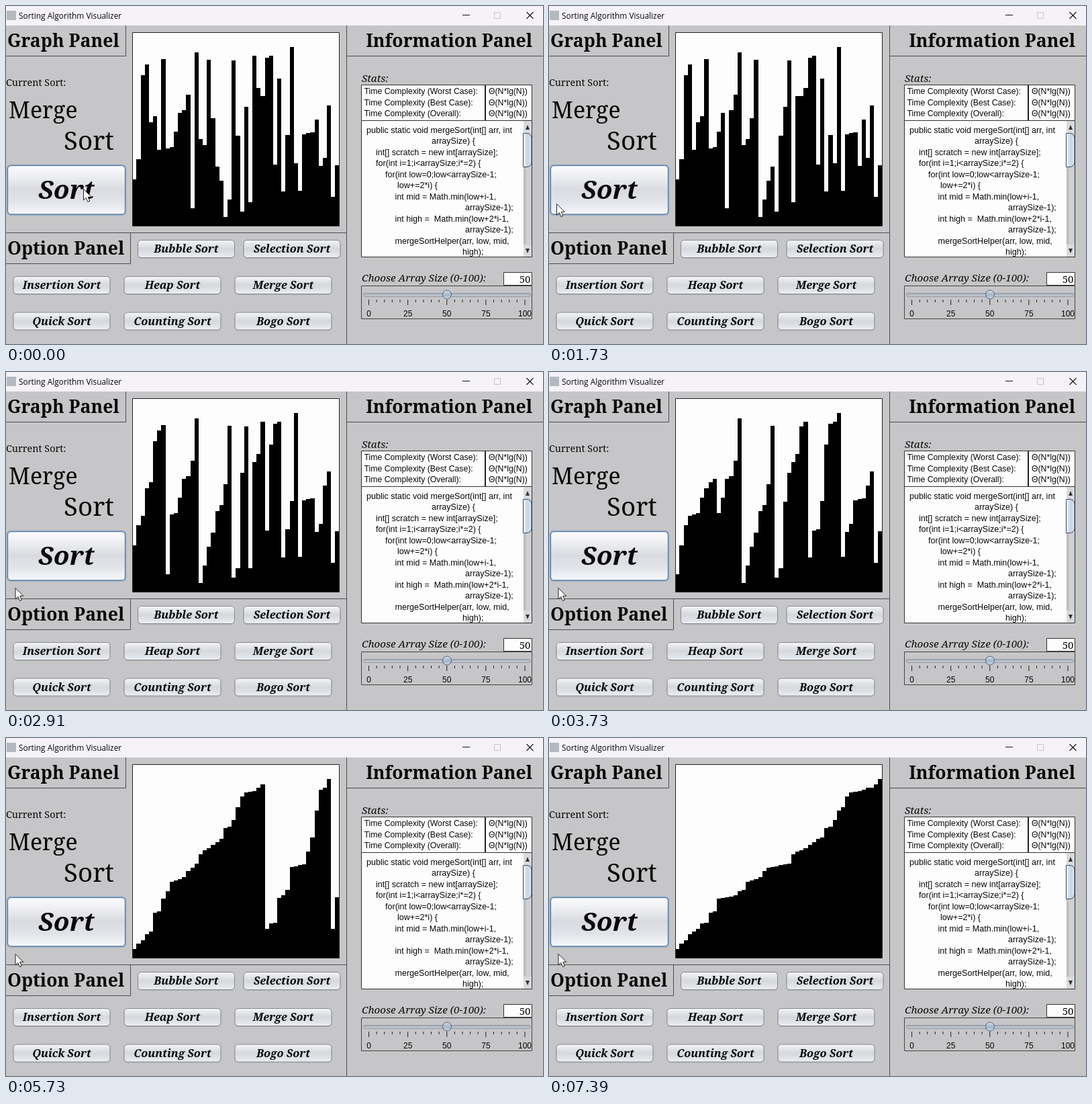
Recreate the animation shown at these times as an HTML page with a canvas. Size 800x503 px, loop 7.64 s.

```html
<!DOCTYPE html>
<html lang="en">
<head>
<meta charset="utf-8">
<title>Sorting Algorithm Visualizer</title>
<style>
html, body { margin: 0; width: 100%; height: 100%; overflow: hidden; background: #c6c5c7; }
canvas { display: block; }
</style>
</head>
<body>
<canvas id="stage" width="800" height="503"></canvas>
<script>
const ctx = document.getElementById('stage').getContext('2d');
const LOOP = 7640;
const SERIF = '"Noto Serif", Georgia, serif';
const ARIAL = '"Liberation Sans", Arial, sans-serif';

// Bar tops in pixels, before sorting.
const tops = [
  258, 228, 103, 87, 173, 164, 214, 79, 212, 210, 187, 159, 155, 132, 301, 69, 198,
  207, 80, 167, 239, 260, 314, 288, 81, 193, 306, 150, 292, 74, 122, 134, 77, 74,
  236, 108, 276, 192, 61, 234, 275, 191, 189, 188, 169, 238, 226, 148, 284, 237];

// [time, array writes done] and [time, x, y]
const progress = [[0, 16], [1730, 80], [2910, 126], [3390, 147], [3550, 151],
  [3730, 160], [4850, 202], [5730, 236], [7390, 300], [LOOP, 300]];
const pointer = [[0, 115, 272], [150, 115, 272], [900, 28, 290], [1730, 11, 294],
  [2150, 13.5, 321], [LOOP, 13.5, 321]];

// Bottom-up merge sort; every copy back from scratch is one visible write.
function mergeWrites(source) {
  const arr = [...source], writes = [], n = arr.length;
  for (let size = 1; size < n; size *= 2) {
    for (let low = 0; low < n - 1; low += 2 * size) {
      const merged = arr.slice(low, low + 2 * size).sort((a, b) => b - a);
      merged.forEach((v, k) => { arr[low + k] = v; writes.push([low + k, v]); });
    }
  }
  return writes;
}
const writes = mergeWrites(tops);

function track(keys, t) {
  let i = 0;
  while (i < keys.length - 2 && t >= keys[i + 1][0]) i++;
  const a = keys[i], b = keys[i + 1], p = (t - a[0]) / (b[0] - a[0]);
  return a.slice(1).map((v, k) => v + (b[k + 1] - v) * p);
}

function text(str, x, y, font, align = 'left', color = '#080808') {
  ctx.font = font;
  ctx.textAlign = align;
  ctx.fillStyle = color;
  ctx.fillText(str, x, y);
}

function line(color, width, ...pts) {
  ctx.beginPath();
  for (let i = 0; i < pts.length; i += 2) ctx.lineTo(pts[i], pts[i + 1]);
  ctx.strokeStyle = color;
  ctx.lineWidth = width;
  ctx.stroke();
}

function shape(pts, fill, stroke) {
  ctx.beginPath();
  for (let i = 0; i < pts.length; i += 2) ctx.lineTo(pts[i], pts[i + 1]);
  ctx.closePath();
  ctx.fillStyle = fill;
  ctx.fill();
  if (stroke) { ctx.strokeStyle = stroke; ctx.lineWidth = 1; ctx.stroke(); }
}

function box(x, y, w, h, fill, stroke, radius = 0, width = 1) {
  ctx.beginPath();
  ctx.roundRect(x, y, w, h, radius);
  if (fill) { ctx.fillStyle = fill; ctx.fill(); }
  if (stroke) { ctx.strokeStyle = stroke; ctx.lineWidth = width; ctx.stroke(); }
}

function shade(x0, y0, x1, y1, ...colors) {
  const g = ctx.createLinearGradient(x0, y0, x1, y1);
  colors.forEach((c, i) => g.addColorStop(i / (colors.length - 1), c));
  return g;
}

function button(label, x, y) {
  box(x + .5, y + 1.5, 144, 26, null, '#b1b1b5', 5);
  box(x + .5, y + .5, 144, 26,
    shade(0, y, 0, y + 27, '#f7f8f9', '#e4e6e9', '#d5d8dd', '#dfe2e7', '#eff1f5'), '#85888e', 5);
  text(label, x + 72.5, y + 19, `italic bold 16.3px ${SERIF}`, 'center');
}

function titleBar() {
  box(0, 0, 800, 29, '#f5f3f7');
  box(1, 7, 14, 14, '#b4b9c0');
  text('Sorting Algorithm Visualizer', 19, 19, '11.9px "Open Sans", sans-serif');
  line('#111', 1, 680, 13.5, 691, 13.5);
  box(727.5, 9.5, 9, 9, null, '#c4c2c6');
  line('#111', 1.1, 775.5, 9, 785.5, 19);
  line('#111', 1.1, 785.5, 9, 775.5, 19);
}

function frames() {
  const edge = '#4c4b4d', heading = `bold 26.6px ${SERIF}`;
  line(edge, 1, 507.5, 29, 507.5, 503);
  line(edge, 1, 0, 337.5, 507, 337.5);
  line(edge, 1, 0, 74.5, 178.5, 74.5, 178.5, 29);
  line(edge, 1, 0, 383.5, 185.5, 383.5, 185.5, 338);
  line(edge, 1, 508, 74.5, 800, 74.5);
  text('Graph Panel', 2, 61, heading);
  text('Option Panel', 2, 370, heading);
  text('Information Panel', 784, 61, heading, 'right');
}

function sortControls() {
  text('Current Sort:', 0, 119, `14.4px ${SERIF}`);
  text('Merge', 4, 167, `34px ${SERIF}`);
  text('Sort', 86, 214, `38.5px ${SERIF}`);
  box(2, 237, 176, 73.5,
    shade(0, 237, 0, 310, '#fdfdfe', '#ecedf0', '#d9dbe0', '#e2e4e9', '#f7f9fc'), '#8eabc8', 5, 2.4);
  box(2.5, 237.5, 175, 72.5, null, '#557a9e', 5);
  text('Sort', 90, 287, `italic bold 38.6px ${SERIF}`, 'center');
  button('Bubble Sort', 196, 348);
  button('Selection Sort', 353.5, 348);
  ['Insertion Sort', 'Heap Sort', 'Merge Sort', 'Quick Sort', 'Counting Sort', 'Bogo Sort']
    .forEach((label, i) => button(label, 10.5 + 165 * (i % 3), i < 3 ? 402 : 455.5));
}

function stats() {
  text('Stats:', 530, 113, `italic 15.2px ${SERIF}`);
  box(529.5, 117.5, 254, 53, '#fdfdfd', '#333');
  line('#222', 2, 714, 118, 714, 170);
  ['Worst Case', 'Best Case', 'Overall'].forEach((name, i) => {
    const y = 131 + 16.5 * i, font = `12.25px ${ARIAL}`;
    text(`Time Complexity (${name}):`, 533.5, y, font);
    text('Θ(N*lg(N))', 719, y, font);
  });
}

const code = [
  [537, 'public static void mergeSort(int[] arr, int'],
  [634, 'arraySize) {'],
  [551, 'int[] scratch = new int[arraySize];'],
  [551, 'for(int i=1;i<arraySize;i*=2) {'],
  [565, 'for(int low=0;low<arraySize-1;'],
  [583, 'low+=2*i) {'],
  [579.5, 'int mid = Math.min(low+i-1,'],
  [684, 'arraySize-1);'],
  [579.5, 'int high =  Math.min(low+2*i-1,'],
  [684, 'arraySize-1);'],
  [579.5, 'mergeSortHelper(arr, low, mid,'],
  [680, 'high);']];

function codeArea() {
  box(529.5, 170.5, 254, 203, '#fdfdfd');
  code.forEach(([x, str], i) => text(str, x, 188.7 + 16.52 * i, `12.55px ${ARIAL}`));
  box(771, 171, 12, 202, shade(771, 0, 783, 0, '#b4b5b9', '#d2d3d6', '#cbccd0'));
  box(771, 171, 12, 18, '#d8dadd');
  box(771, 355, 12, 18, '#d8dadd');
  box(770.5, 189.5, 12.5, 50, shade(771, 0, 783, 0, '#eef4fa', '#c3d5e7', '#dce8f4'), '#3b4a5a', [0, 7, 7, 0]);
  shape([777, 177, 780, 184, 774, 184], '#333');
  shape([777, 368, 780, 361, 774, 361], '#333');
  box(529.5, 170.5, 254, 203, null, '#333');
}

function slider() {
  text('Choose Array Size (0-100):', 530, 410, `italic 15.2px ${SERIF}`);
  box(741.5, 396.5, 42, 19, '#fdfdfd', '#333');
  text('50', 781.5, 411.5, `15px ${SERIF}`, 'right');
  box(529.5, 416.5, 254, 49, null, '#444');
  box(532.5, 427.5, 249, 5, shade(0, 427, 0, 433, '#98a0a9', '#b6bec8', '#cbd1d8'), '#949aa2', 3);
  for (let v = 0; v <= 100; v += 5) {
    const x = 540.5 + v * 2.325, major = v % 25 === 0;
    line('#222', 1, x, 437, x, major ? 445 : 441);
    if (major) text(String(v), x, 461.5, `12px ${ARIAL}`, 'center');
  }
  ctx.beginPath();
  ctx.arc(657, 429.5, 6.5, 0, 7);
  ctx.fillStyle = shade(0, 423, 0, 436, '#dbe3eb', '#a3b7ca', '#c6d6e6');
  ctx.fill();
  ctx.strokeStyle = '#50657a';
  ctx.lineWidth = 1;
  ctx.stroke();
}

function graph(count) {
  const bars = [...tops], edge = i => Math.round(188.3 + i * 6.164);
  writes.slice(0, count).forEach(([i, v]) => { bars[i] = v; });
  box(188.5, 39.5, 308, 288, '#fdfdfd');
  bars.forEach((y, i) => box(edge(i), y, edge(i + 1) - edge(i), 327 - y, '#000'));
  box(188.5, 39.5, 308, 288, null, '#222');
}

function cursor(x, y) {
  ctx.save();
  ctx.translate(x, y);
  shape([.5, .5, .5, 17, 4.3, 13.4, 7, 19.5, 9.8, 18.3, 7.2, 12.3, 12.3, 12.3], '#fff', '#222');
  ctx.restore();
}

function draw(now) {
  const t = now % LOOP;
  box(0, 0, 800, 503, '#c6c5c7');
  titleBar();
  frames();
  sortControls();
  stats();
  codeArea();
  slider();
  graph(Math.floor(track(progress, t)[0] + 1e-6));
  cursor(...track(pointer, t));
  requestAnimationFrame(draw);
}
requestAnimationFrame(draw);
</script>
</body>
</html>
```
